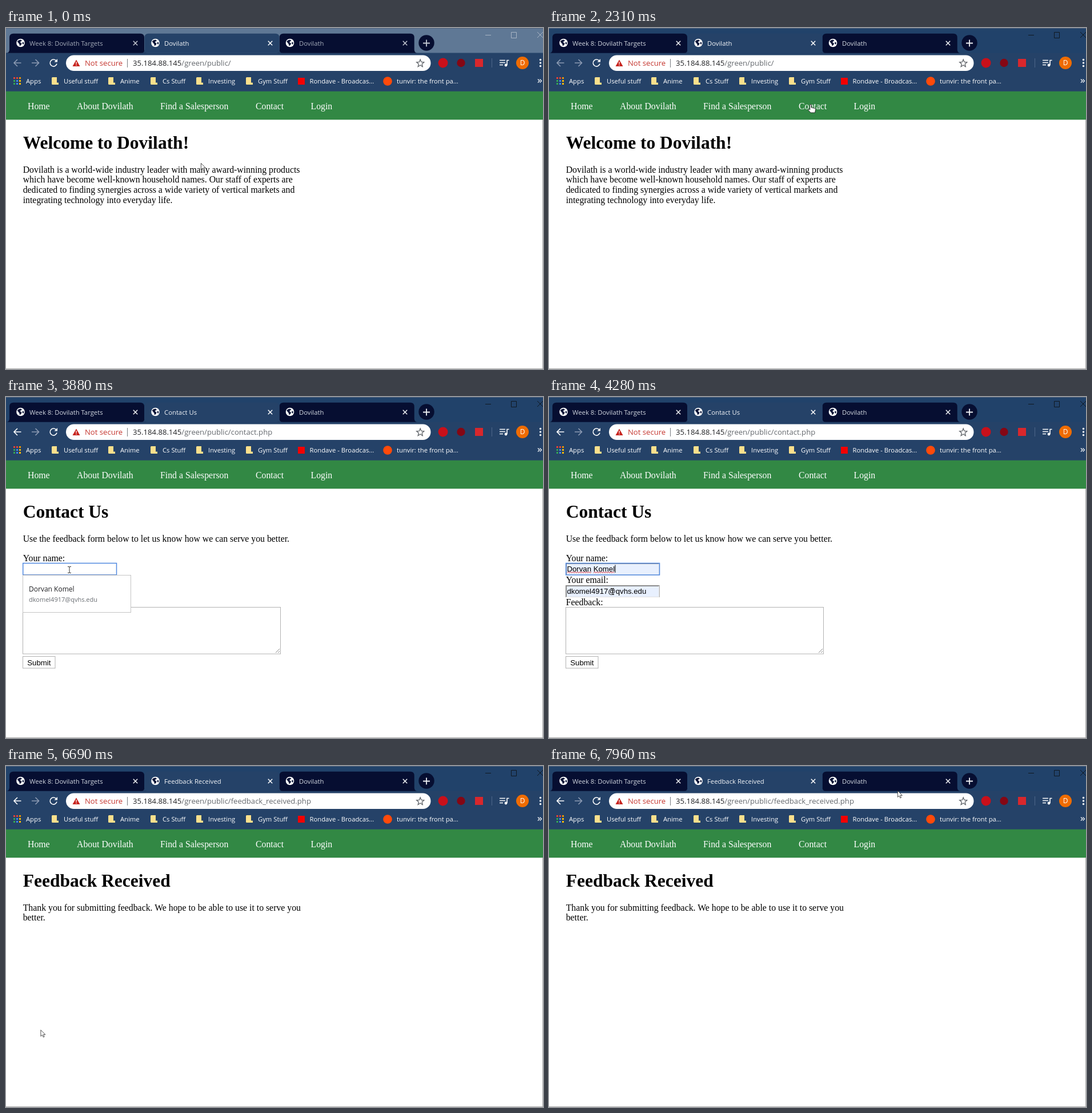
An HTML page that plays this animation: 940x596 px, repeating every 8000 ms.

```html
<!DOCTYPE html>
<html lang="en">
<head>
<meta charset="utf-8">
<title>Feedback form</title>
<style>
html, body { margin: 0; width: 100%; height: 100%; overflow: hidden; background: #fff; }
svg { display: block; width: 940px; height: 596px; }
.ui { font-family: "Open Sans", "Noto Sans", sans-serif; }
.tab { font-size: 11.3px; }
.mark { font-size: 11.25px; fill: #fff; }
.url { font-size: 13.1px; }
.page { font: 15.8px "Liberation Serif", serif; fill: #000; }
.page .h1 { font-size: 31.5px; font-weight: bold; }
.field { font: 13.2px "Liberation Sans", sans-serif; fill: #000; }
.code { font: 12px "Noto Sans Mono", monospace; fill: #000; }
.box { fill: #fff; stroke: #b2b2b2; }
.ring { fill: none; stroke: #4f88e0; stroke-width: 1.5; }
.wave { fill: none; stroke: #e02020; }
.line { fill: none; stroke: #fff; stroke-width: 1.6; }
</style>
</head>
<body>
<svg viewBox="0 0 940 596">
  <defs>
    <path id="folder" d="M0 1.5Q0 0 1.5 0H9V9.5H12V13H1.5Q0 13 0 11.5Z"/>
    <path id="tab" d="M-6 34Q0 34 0 28V7Q0 0 7 0H229Q236 0 236 7V28Q236 34 242 34Z"/>
    <g id="globe">
      <circle r="7.3" fill="#fff"/>
      <path d="M-5.800 -2.500Q-3 -6 1 -5.300L2.500 -3.500 0 -2.500 -.5 -.5 2 .6 1.200 3.500 -1.500 5.500 -2.200 2.200Z" fill="#0a1538"/>
      <path d="M3.500 -1.500L6 -.5 5 3 3 1Z" fill="#0a1538"/>
    </g>
    <path id="x" d="M-3.700 -3.700L3.700 3.700M3.700 -3.700L-3.700 3.700" stroke-width="1.500"/>
    <g id="inset">
      <path d="M0 0H164V21H0Z" fill="#e8f0fe"/>
      <path d="M1 21V1H164" fill="none" stroke="#8b8b8b" stroke-width="2"/>
      <path d="M1 20.500H163.500V1" fill="none" stroke="#e0e0e0"/>
    </g>
  </defs>

  <rect width="940" height="596" fill="#fff"/>
  <rect id="bar" width="940" height="45"/>
  <path d="M0 .5H940" stroke="#54657c"/>
  <rect y="43.500" width="940" height="67.500" fill="#254268"/>
  <g fill="#060e31">
    <use href="#tab" x="6" y="9.700"/>
    <use href="#tab" x="478.700" y="9.700"/>
    <circle cx="736" cy="26" r="13.700"/>
  </g>
  <use href="#tab" x="242.500" y="9.700" fill="#254268"/>
  <use href="#globe" x="25.500" y="26"/>
  <use href="#globe" x="261.500" y="26"/>
  <use href="#globe" x="497" y="26"/>
  <g class="ui tab">
    <text id="tabA" x="41" y="30.500">Week 8: Dovilath Targets</text>
    <text id="tabB" x="277" y="30.500" fill="#f3f5f8"></text>
    <text id="tabC" x="513" y="30.500">Dovilath</text>
  </g>
  <g id="tabMarks">
    <use href="#x" x="226.500" y="26.500"/>
    <use href="#x" x="698.500" y="26.500"/>
    <path d="M730 26.500H742M736 20.500V32.500" stroke-width="1.800"/>
  </g>
  <use href="#x" x="462.500" y="26.500" stroke="#fff"/>
  <g id="winMarks" fill="none">
    <path d="M839 12.500H849M884.500 7.500H893.500V17.500H884.500ZM930 7L940 17M940 7L930 17"/>
  </g>

  <path id="back" class="line" d="M26.500 61H14M20 55L14 61 20 67"/>
  <path class="line" d="M45 61H57.500M51.500 55L57.500 61 51.500 67" style="stroke:#8c9bb3"/>
  <path class="line" d="M88 57.500A6 6 0 1 0 89 62.500"/>
  <path d="M84.500 59.500H90V54Z" fill="#fff"/>
  <rect x="105" y="47.500" width="638.500" height="27.500" rx="13.750" fill="#fff"/>
  <path d="M123 55.500L129.500 67H116.500Z" fill="#c7241f"/>
  <path d="M123 59V63M123 64V65.500" stroke="#fff" stroke-width="1.300"/>
  <g class="ui url">
    <text x="138" y="66" fill="#c5362f">Not secure</text>
    <text x="222" y="66" fill="#202124">35.184.88.145<tspan id="path" fill="#65696e"></tspan></text>
  </g>
  <path d="M212.500 54V69" stroke="#777b80"/>
  <path d="M725.200 55L727 59.400 731.700 59.800 728.100 62.900 729.200 67.500 725.200 65 721.200 67.500 722.300 62.900 718.700 59.800 723.400 59.400Z" fill="none" stroke="#5f6368" stroke-width="1.300"/>
  <circle cx="765" cy="61" r="8.500" fill="#c9101a"/>
  <circle cx="796.500" cy="61" r="7.200" fill="#850714"/>
  <rect x="821" y="54" width="14" height="14" fill="#d9272c"/>
  <path d="M850.500 53V69" stroke="#4d678a"/>
  <path class="line" d="M864 56.500H874M864 60.500H874M864 64.500H870M877 65V56.500H880.500"/>
  <circle cx="875" cy="65" r="2.400" fill="#fff"/>
  <circle cx="904" cy="61" r="11" fill="#ef6c00"/>
  <text class="ui" x="904" y="65.300" font-size="12" text-anchor="middle" fill="#fff">D</text>
  <g fill="#fff"><circle cx="935.500" cy="55.500" r="1.700"/><circle cx="935.500" cy="61" r="1.700"/><circle cx="935.500" cy="66.500" r="1.700"/></g>

  <g id="apps"></g>
  <g id="marks" class="ui mark"></g>
  <rect x="511" y="87" width="12" height="12" fill="#f40000"/>
  <circle cx="668" cy="93" r="7.800" fill="#ff4a0a"/>
  <path class="line" d="M931 89.500L934 92.500 931 95.500M934.500 89.500L937.500 92.500 934.500 95.500" style="stroke-width:1.200"/>

  <rect y="110.700" width="940" height="49.600" fill="#328844"/>
  <g id="nav" class="page" style="fill:#fff"></g>

  <g id="home" class="page"></g>
  <g id="contact" class="page">
    <rect class="box" x="29.500" y="290.500" width="164" height="20"/>
    <rect class="box" x="29.500" y="329.500" width="164" height="20"/>
    <rect class="box" x="29.500" y="367.500" width="451" height="81.500"/>
    <path d="M472 447L479 440M476 447L479 444" stroke="#8a8a8a"/>
    <rect class="box" x="29.500" y="453.500" width="56.500" height="20.500"/>
    <text class="field" x="37.300" y="468.500">Submit</text>
    <g id="filled">
      <use href="#inset" x="29" y="290"/>
      <use href="#inset" x="29" y="329"/>
      <text class="field" x="31.500" y="305">Dorvan Komel</text>
      <text class="field" x="31.500" y="344">dkomel4917@qvhs.edu</text>
    </g>
    <g id="nameFocus">
      <rect class="ring" x="29.700" y="290.500" width="163.800" height="20.500"/>
      <path id="nameCaret" d="M115.900 293.500V307" stroke="#000"/>
    </g>
    <g id="nameWaves"></g>
    <g id="menu">
      <rect x="29.500" y="311.500" width="189" height="65" fill="#fff" stroke="#c4c4c4"/>
      <rect id="hover" x="30" y="318" width="188" height="52" fill="#e9e9ea"/>
      <text class="ui" x="40" y="340" font-size="12" fill="#202124">Dorvan Komel</text>
      <text class="ui" x="40" y="358" font-size="11" fill="#6b6f74">dkomel4917@qvhs.edu</text>
    </g>
    <rect id="areaFocus" class="ring" x="29.500" y="367.700" width="451.500" height="81.500"/>
    <g id="script">
      <text class="code" x="33" y="383">&lt;script&gt; alert("Dorvan has discovered an XSS exploit")</text>
      <text class="code" x="33" y="398">&lt;/script&gt;</text>
    </g>
    <path id="areaCaret" stroke="#000"/>
  </g>
  <g id="thanks" class="page"></g>
  <path d="M939.500 160V596M0 595.500H940" stroke="#a9a9a9"/>

  <g id="arrow">
    <path d="M.4 .4V11.400L3 9 4.800 13 6.600 12.200 4.900 8.400H8.300Z" fill="#fff" stroke="#222" stroke-width=".8"/>
  </g>
  <g id="beam">
    <path d="M-3 -5.500H-1L0 -4.800 1 -5.500H3M0 -5V5M-3 5.500H-1L0 4.800 1 5.500H3" fill="none" stroke="#333"/>
  </g>
  <g id="hand">
    <path d="M-1.200 0Q0 -1 1.200 0V5L7.500 6.500Q9 7 8.600 9L7.500 14H0L-4 9.500Q-4 7.500 -2.500 8L-1.200 9Z" fill="#fff" stroke="#222" stroke-width=".9"/>
  </g>
</svg>
<script>
const LOOP = 8000;
const el = id => document.getElementById(id);
const show = (id, on) => { el(id).style.display = on ? "" : "none"; };
const text = (x, y, s, cls = "") => `<text class="${cls}" x="${x}" y="${y}">${s}</text>`;
const lines = (...rows) => rows.map((s, i) => text(29.7, 252.5 + i * 17.8, s)).join("");
const heading = s => text(29.7, 211, s, "h1");

function wave(x1, x2, y) {
  let d = `M${x1} ${y}`;
  for (let x = x1 + 2, up = 1; x <= x2; x += 2, up = 1 - up) d += `L${x} ${y - up * 2}`;
  return `<path class="wave" d="${d}"/>`;
}

const LINKS = [["Home", 38, 77], ["About Dovilath", 124, 223], ["Find a Salesperson", 270, 390],
  ["Contact", 437, 486], ["Login", 533.5, 571]];
el("nav").innerHTML = LINKS.map(([s, x]) => text(x, 142, s)).join("");

const FOLDERS = [["Useful stuff", 101], ["Anime", 200], ["Cs Stuff", 274], ["Investing", 354], ["Gym Stuff", 441]];
el("marks").innerHTML = text(35, 96.7, "Apps") +
  FOLDERS.map(([s, x]) => `<use href="#folder" x="${x - 21}" y="86" fill="#fbe08c"/>` + text(x, 96.7, s)).join("") +
  text(531.5, 96.7, "Rondave - Broadcas...") + text(684, 96.7, "tunvir: the front pa...");

const DOTS = ["#ea4335", "#ea4335", "#f29900", "#34a853", "#4285f4", "#fbbc04", "#34a853", "#4285f4", "#fbbc04"];
el("apps").innerHTML = DOTS.map((c, i) =>
  `<rect x="${13 + i % 3 * 5}" y="${86 + Math.floor(i / 3) * 5}" width="3" height="3" fill="${c}"/>`).join("");

el("home").innerHTML = heading("Welcome to Dovilath!") + lines(
  "Dovilath is a world-wide industry leader with many award-winning products",
  "which have become well-known household names. Our staff of experts are",
  "dedicated to finding synergies across a wide variety of vertical markets and",
  "integrating technology into everyday life.");
el("contact").insertAdjacentHTML("afterbegin", heading("Contact Us") +
  lines("Use the feedback form below to let us know how we can serve you better.") +
  text(29.7, 286.5, "Your name:") + text(29.7, 325, "Your email:") + text(29.7, 364, "Feedback:"));
el("thanks").innerHTML = heading("Feedback Received") + lines(
  "Thank you for submitting feedback. We hope to be able to use it to serve you", "better.");
el("nameWaves").innerHTML = wave(32, 74, 307.5) + wave(78, 115, 307.5);
el("script").insertAdjacentHTML("beforeend", wave(148, 191, 386) + wave(329, 351, 386));

const PAGES = {
  home: ["Dovilath", "/green/public/"],
  contact: ["Contact Us", "/green/public/contact.php"],
  thanks: ["Feedback Received", "/green/public/feedback_received.php"]
};

const BURSTS = [[120, 1070, 7], [1190, 2030, 7], [2700, 3730, 9], [3880, 4000, 2],
  [4280, 5220, 7], [5340, 6270, 8], [6420, 7080, 6], [7390, 7960, 5]];
const STEPS = BURSTS.flatMap(([a, b, n]) =>
  Array.from({ length: n }, (_, i) => Math.floor((a + (b - a) * i / (n - 1)) / 10) * 10));
const snap = t => STEPS.reduce((last, s) => s <= t ? s : last, 0);

// Pointer way: time, x, y
const WAY = [[0, 341, 236], [1070, 497, 139], [1330, 551, 134], [1610, 396.5, 135.5], [2030, 458, 134],
  [2700, 458, 134], [3080, 270, 387], [3340, 225, 485], [3730, 115, 301], [3880, 111, 302],
  [4000, 111, 340], [4280, 111, 340], [4740, 170, 400], [5220, 180, 486], [5730, 172.5, 506],
  [5870, 165, 513], [6270, 60.5, 461], [7240, 60.5, 461], [7670, 787, 150], [7960, 610, 43]];

function pointer(t) {
  const i = Math.max(1, WAY.findIndex(p => p[0] >= t));
  const [t0, x0, y0] = WAY[i - 1], [t1, x1, y1] = WAY[i];
  const k = (t - t0) / (t1 - t0);
  return [x0 + (x1 - x0) * k, y0 + (y1 - y0) * k];
}

function shape(x, y, page, menu) {
  if (y > 128 && y < 146 && LINKS.some(l => x >= l[1] && x <= l[2])) return "hand";
  if (page !== "contact" || (menu && y > 312)) return "arrow";
  const input = x > 29 && x < 194 && ((y > 290 && y < 311) || (y > 329 && y < 350));
  const area = x > 29 && x < 481 && y > 367 && y < 449;
  return input || area ? "beam" : "arrow";
}

function draw(t) {
  const active = t >= 2310;
  const page = t < 2700 ? "home" : t < 6550 ? "contact" : "thanks";
  const menu = t >= 3880 && t < 4280;
  const area = t >= 4740 && t < 6420;
  const pasted = t >= 5340;

  for (const name in PAGES) show(name, name === page);
  el("tabB").textContent = PAGES[page][0];
  el("path").textContent = PAGES[page][1];
  el("bar").setAttribute("fill", active ? "#21426a" : "#5f7895");
  for (const id of ["tabA", "tabC"]) el(id).setAttribute("fill", active ? "#d2d7e0" : "#a4abb9");
  el("tabMarks").setAttribute("stroke", active ? "#f0f2f5" : "#c3c8d2");
  el("winMarks").setAttribute("stroke", active ? "#101820" : "#a9b5c4");
  el("back").style.stroke = page === "home" ? "#8c9bb3" : "#fff";

  show("filled", t >= 4000);
  show("nameFocus", t >= 3880 && t < 4740);
  show("nameCaret", t >= 4280);
  show("nameWaves", t >= 4280 && t < 4740);
  show("menu", menu);
  show("hover", t >= 4000);
  show("areaFocus", area);
  show("script", pasted);
  show("areaCaret", area && (t - (pasted ? 5340 : 4740)) % 1060 < 530);
  el("areaCaret").setAttribute("d", pasted ? "M97.5 387.5V401" : "M33.5 373V386.5");

  const [x, y] = pointer(snap(t));
  const kind = shape(x, y, page, menu);
  for (const k of ["arrow", "beam", "hand"]) show(k, k === kind);
  el(kind).setAttribute("transform", `translate(${x.toFixed(1)} ${y.toFixed(1)})`);
}

function tick() {
  draw(performance.now() % LOOP);
  requestAnimationFrame(tick);
}
tick();
</script>
</body>
</html>
```
